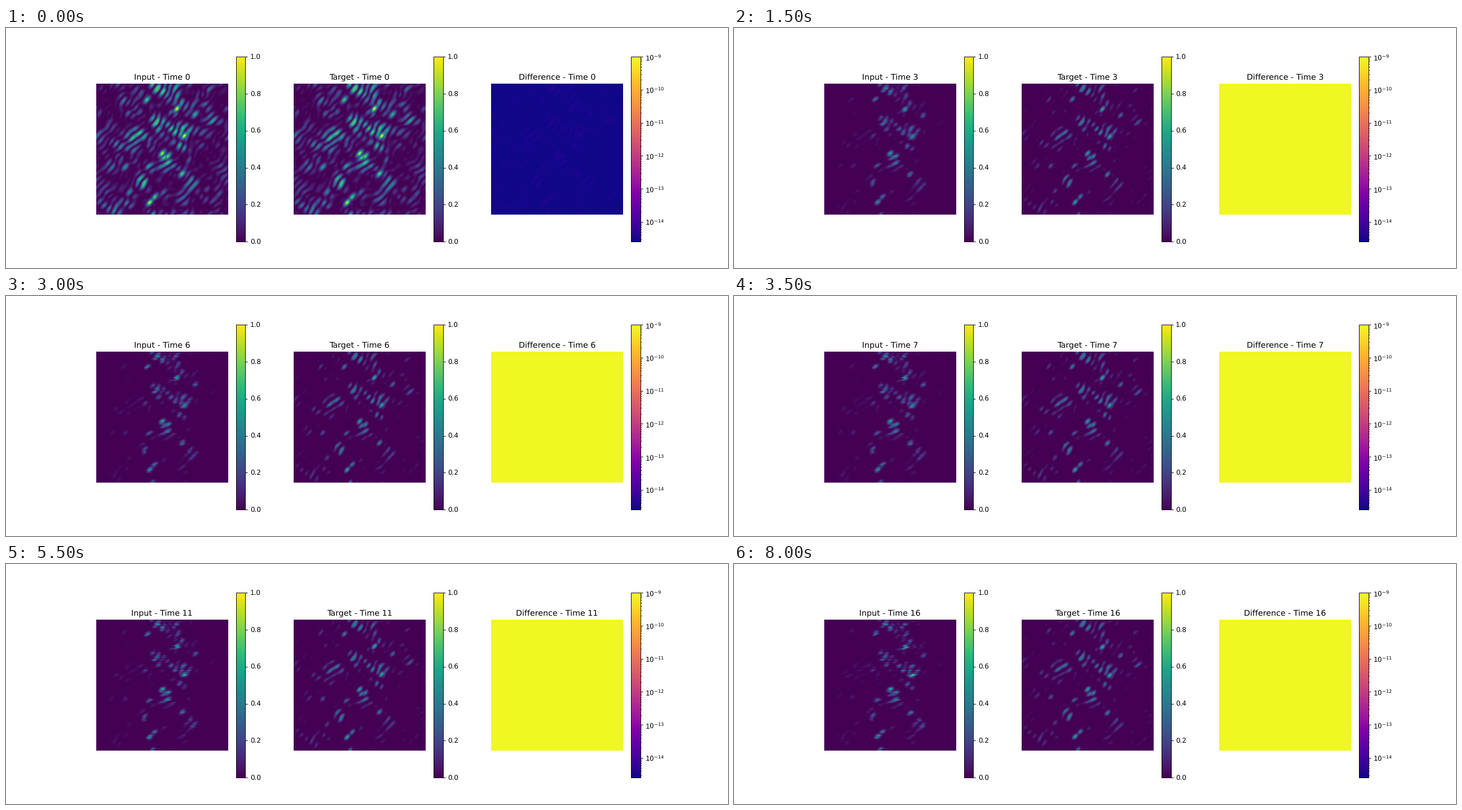
A matplotlib script that plays this animation: 1280 px wide and 427 px high, repeating every 8.5 s.

```python
import numpy as np
import matplotlib.pyplot as plt
from matplotlib.animation import FuncAnimation
from matplotlib.colors import LogNorm

FRAMES, INTERVAL = 17, 500
N = 233
DPI = 1280 / 15
VMIN, VMAX = 2.53e-15, 1e-9
SLANT = np.radians(50)

plt.rcParams["text.hinting"] = "no_hinting"
rng = np.random.default_rng(7)
Y, X = np.mgrid[0:N, 0:N].astype(float)
col = np.arange(N)
freq = np.fft.fftfreq(N)

# The brightest grains: x, y, peak value
GRAINS = [(89, 29, .75), (142, 45, 1), (174, 55, .65), (155, 93, 1),
          (116, 124, .95), (126, 129, .8), (151, 160, .78), (51, 148, .55),
          (94, 211, .95), (103, 201, .75)]


def slanted(dx, dy):
    """Coordinates along and across the slant of the grains."""
    c, s = np.cos(SLANT), np.sin(SLANT)
    return dx * c - dy * s, dx * s + dy * c


def speckle():
    """Squared band-limited noise, strongest near the middle columns."""
    ky, kx = np.meshgrid(freq, freq, indexing="ij")
    along, across = slanted(kx, ky)
    band = np.exp(-(along / .036) ** 2 - ((np.abs(across) - .045) / .024) ** 2)
    field = np.fft.ifft2(np.fft.fft2(rng.standard_normal((N, N))) * band).real
    field /= field.std()
    envelope = .35 + .65 * np.exp(-((X - 128) / 60) ** 2)
    return np.clip(.12 * envelope * field ** 2, 0, .7)


def grain(x, y, peak):
    along, across = slanted(X - x, Y - y)
    return peak * np.exp(-(along / 4.9) ** 2 / 2 - (across / 2.5) ** 2 / 2)


def shear(img, amount):
    """Slide each column in proportion to its distance from the middle."""
    phase = np.exp(-2j * np.pi * np.outer(freq, amount * (col - N / 2)))
    return np.fft.ifft(np.fft.fft(img, axis=0) * phase, axis=0).real


def bump(lo, hi, soft):
    return 1 / (1 + np.exp((lo - col) / soft)) / (1 + np.exp((col - hi) / soft))


start = speckle()
for g in GRAINS:
    start = np.maximum(start, grain(*g))
faded = .62 * np.clip((start - .12) / .88, 0, 1) ** 1.3

window = np.clip(bump(84, 181, 2) + .4 * bump(22, 57, 3)
                 + .12 * bump(60, 215, 6), 0, 1)
row_shift, row_gain = np.repeat(rng.standard_normal((2, N // 2 + 1)), 2, axis=1)[:, :N]


def streaked(img, t):
    """Windowed copy whose rows drift apart with time."""
    taps = np.arange(-4, 5)
    weights = np.exp(-(taps / 1.7) ** 2 / 2)
    weights *= 1.1 / weights.sum()
    smear = sum(w * np.roll(img, k, axis=1) for k, w in zip(taps, weights))
    age = t / (FRAMES - 1)
    shifts = np.rint((.4 + .8 * age) * row_shift).astype(int)
    gain = np.clip(1 + (.08 + .25 * age) * row_gain, .2, 1.6)
    rows = smear[col[:, None], (col - shifts[:, None]) % N]
    return rows * gain[:, None] * window


def panels(t):
    if t == 0:
        return start, start, VMIN * (1.1 + .4 * start)
    target = np.clip(shear(faded, .01 * t), 0, 1)
    return streaked(target, t), target, np.full((N, N), VMAX)


fig, axes = plt.subplots(1, 3, figsize=(1280.001 / DPI, 427.001 / DPI), dpi=DPI)
names = ["Input", "Target", "Difference"]
images = []
for i, ax in enumerate(axes):
    if i < 2:
        style = dict(cmap="viridis", vmin=0, vmax=1)
    else:
        style = dict(cmap="plasma", norm=LogNorm(VMIN, VMAX))
    image = ax.imshow(panels(0)[i], **style)
    fig.colorbar(image, ax=ax)
    ax.axis("off")
    images.append(image)


def update(t):
    for ax, image, name, data in zip(axes, images, names, panels(t)):
        image.set_data(data)
        ax.set_title(f"{name} - Time {t}")
    return images


anim = FuncAnimation(fig, update, frames=FRAMES, interval=INTERVAL,
                     repeat=True, repeat_delay=0, blit=False)
plt.show()
```
